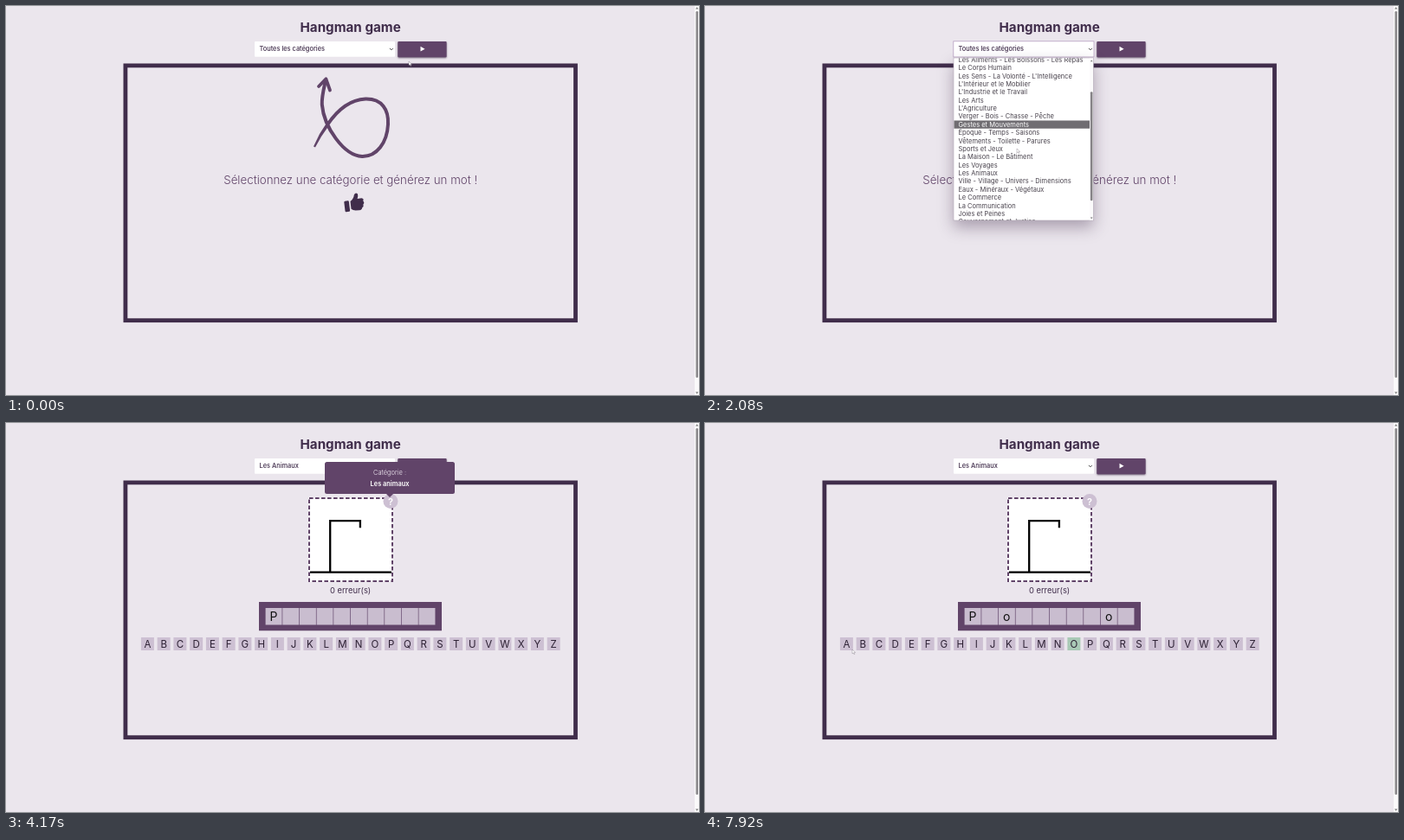
An HTML page with a canvas that plays this animation: 800x450 px, repeating every 8000 ms.

```html
<!DOCTYPE html>
<html lang="fr">
<head>
<meta charset="utf-8">
<title>Hangman game</title>
<style>
html, body { margin: 0; width: 100%; height: 100%; overflow: hidden; background: #ebe6ed; }
canvas { display: block; width: 800px; height: 450px; }
</style>
</head>
<body>
<canvas id="stage"></canvas>
<script>
const LOOP = 8000;
const OPEN = 560, CHOOSE = 3550, PLAY = 3850, GUESS = 7150;
const BG = '#ebe6ed', DARK = '#402d4b', PURPLE = '#614469', LILAC = '#cdc0d3';
const ROW = 9.37, LIST_TOP = 60.3;

const categories = [
  'Toutes les catégories', "L'École - La Classe - L'Instruction", 'Paysages - Climat - Formes',
  'Qualités et Défauts', 'Calcul et Mesures', 'Les Aliments - Les Boissons - Les Repas',
  'Le Corps Humain', "Les Sens - La Volonté - L'Intelligence", "L'Intérieur et le Mobilier",
  "L'Industrie et le Travail", 'Les Arts', "L'Agriculture", 'Verger - Bois - Chasse - Pêche',
  'Gestes et Mouvements', 'Époque - Temps - Saisons', 'Vêtements - Toilette - Parures',
  'Sports et Jeux', 'La Maison - Le Bâtiment', 'Les Voyages', 'Les Animaux',
  'Ville - Village - Univers - Dimensions', 'Eaux - Minéraux - Végétaux', 'Le Commerce',
  'La Communication', 'Joies et Peines', 'Gouvernement et Justice', "L'Armée",
  'Vie Humaine - Maladies - Hygiène'
];

// Pointer tip: time, x, y
const pointerPath = [
  [0, 465, 64], [120, 465, 64], [480, 400, 52], [620, 398, 52], [920, 382, 68],
  [1330, 368, 94.5], [1700, 362, 150], [2080, 360, 165], [2500, 358, 185],
  [3080, 348, 197], [3380, 328, 170], [3580, 325, 169], [3800, 478, 53],
  [3880, 478, 53], [4020, 445, 89], [5300, 444, 91], [5800, 444, 245],
  [6000, 444, 257], [6420, 440, 257], [6850, 441, 257], [7020, 426, 257],
  [7450, 424, 261], [7600, 395, 275], [7920, 170, 262], [8000, 170, 262]
];

const canvas = document.getElementById('stage');
const ctx = canvas.getContext('2d');
const dpr = window.devicePixelRatio || 1;
canvas.width = 800 * dpr;
canvas.height = 450 * dpr;

const ramp = (t, from, to) => {
  const p = Math.min(1, Math.max(0, (t - from) / (to - from)));
  return p * p * (3 - 2 * p);
};

function pointerAt(t) {
  const i = Math.max(1, pointerPath.findIndex(p => p[0] > t));
  const [a, b] = [pointerPath[i - 1], pointerPath[i]];
  const k = ramp(t, a[0], b[0]);
  return [a[1] + (b[1] - a[1]) * k, a[2] + (b[2] - a[2]) * k];
}

const scrollAt = t => 75 * Math.min(1, Math.max(0, (t - 1800) / 424));

function rect(x, y, w, h, color, radius = 0) {
  ctx.fillStyle = color;
  ctx.beginPath();
  ctx.roundRect(x, y, w, h, radius);
  ctx.fill();
}

function poly(color, ...points) {
  ctx.fillStyle = color;
  ctx.beginPath();
  for (let i = 0; i < points.length; i += 2) ctx.lineTo(points[i], points[i + 1]);
  ctx.fill();
}

function stroke(path, color, width) {
  ctx.strokeStyle = color;
  ctx.lineWidth = width;
  ctx.stroke(new Path2D(path));
}

function shadowed(color, dy, blur, draw) {
  ctx.save();
  ctx.shadowColor = color;
  ctx.shadowOffsetY = dy * dpr;
  ctx.shadowBlur = blur * dpr;
  draw();
  ctx.restore();
}

// y is the middle of the capital letters
function text(str, x, y, size, color, weight = 400, align = 'center') {
  ctx.font = `${weight} ${size}px Inter, sans-serif`;
  ctx.textAlign = align;
  ctx.fillStyle = color;
  ctx.fillText(str, x, y + size * 0.364);
}

function drawPage(t) {
  rect(0, 0, 800, 450, BG);
  rect(795, 0, 5, 450, '#faf9fa');
  rect(796.4, 6, 2.6, 424, '#8b898c', 1.3);
  poly('#777', 796, 3.5, 799.4, 3.5, 797.7, 1.2);
  poly('#777', 796, 446.5, 799.4, 446.5, 797.7, 448.8);

  text('Hangman game', 397.6, 24, 15.2, DARK, 700);
  ctx.strokeStyle = DARK;
  ctx.lineWidth = 4.8;
  ctx.strokeRect(137.9, 68.9, 519.6, 294.8);

  const open = t >= OPEN && t < CHOOSE;
  rect(287, 41, 162, 17.7, '#fff', 1);
  if (open) {
    ctx.strokeStyle = '#b9a3c4';
    ctx.lineWidth = 0.8;
    ctx.strokeRect(286.8, 40.8, 162.2, 18.2);
  }
  text(t < CHOOSE ? categories[0] : categories[19], 292.5, 49.8, 7.4, DARK, 500, 'left');
  stroke('M443 48.9 L444.9 50.8 L446.8 48.9', '#333', 0.9);

  shadowed('rgba(50,30,60,.6)', 1, 2, () => rect(452.3, 41, 56.3, 18.2, PURPLE, 1));
  poly('#fff', 478.5, 46.8, 483.6, 49.7, 478.5, 52.6);
}

function drawWelcome() {
  ctx.lineCap = ctx.lineJoin = 'round';
  poly(PURPLE, 355, 162.5, 362, 148, 370, 135.5, 373, 138, 364, 151, 357, 163.5);
  stroke('M371 137.5 C380 124 395 108.5 415 107.5 C434 107 442 120 441 137 ' +
         'C440 158 428 174.5 411 174 C390 173 367 140 364.8 114 C364.3 105 367 95 369 86', PURPLE, 4);
  stroke('M361 93 L369.4 84.3 L374 97.5', PURPLE, 3.8);
  ctx.lineCap = 'butt';
  ctx.lineJoin = 'miter';

  text('Sélectionnez une catégorie et générez un mot !', 397.7, 201, 13.33, PURPLE, 300);

  ctx.save();
  ctx.translate(393.7, 231.8);
  ctx.rotate(-0.12);
  rect(-2.8, -6.3, 5.6, 12.6, DARK, 1.2);
  ctx.restore();
  ctx.fillStyle = DARK;
  ctx.fill(new Path2D('M397.5 226 C400.5 223.5 401.5 221 401.8 218.5 Q403.5 215 406 217.5 ' +
    'Q406.8 220.5 405.6 223 L410.5 222.2 Q413.5 222.8 412.2 225.5 Q414.3 227.5 412.4 229.6 ' +
    'Q413.3 232 411.2 233.2 Q411 235.8 408 236.2 L403.5 236.5 Q400.5 236.3 398.5 234.8 Z'));
}

function drawList(t, pointerY) {
  shadowed('rgba(60,40,70,.38)', 8, 18, () => rect(287, 60, 161.3, 188, '#fff', 1));
  ctx.strokeStyle = '#b5aaba';
  ctx.lineWidth = 0.6;
  ctx.strokeRect(287, 60, 161.3, 188);

  const scroll = scrollAt(t);
  // The highlight lags behind while the list scrolls
  const hovered = Math.floor((pointerY + scrollAt(t - 155) - LIST_TOP) / ROW);
  ctx.save();
  ctx.beginPath();
  ctx.rect(287.3, 60.3, 160.8, 187.5);
  ctx.clip();
  categories.forEach((name, i) => {
    const y = LIST_TOP + i * ROW - scroll;
    if (i === hovered) rect(287.3, y, 156.7, ROW, '#706d72');
    text(name, 292.5, y + ROW / 2, 7.5, i === hovered ? '#fff' : '#48424c', 400, 'left');
  });
  rect(444, 60.3, 4.2, 187.6, '#fbfafb');
  rect(444.9, 66 + scroll * 2 / 3, 2.6, 126, '#858386', 1.2);
  poly('#777', 444.8, 64.3, 447.6, 64.3, 446.2, 62.4);
  poly('#777', 444.8, 244.4, 447.6, 244.4, 446.2, 246.3);
  ctx.restore();
}

function drawGame(t) {
  rect(349, 86, 98, 98, '#fff');
  ctx.strokeStyle = PURPLE;
  ctx.lineWidth = 2;
  ctx.setLineDash([4.6, 2.4]);
  ctx.strokeRect(350, 87, 96, 96);
  ctx.setLineDash([]);
  stroke('M351 172.6 H445 M374.2 172.6 V113.2 H408.9 V121.2', '#000', 2.3);

  ctx.fillStyle = LILAC;
  ctx.beginPath();
  ctx.arc(444, 90.5, 8.5, 0, 7);
  ctx.fill();
  text('?', 444, 90.6, 11, '#fff', 600);
  text('0 erreur(s)', 397.6, 193.6, 9.35, DARK);

  rect(292, 207, 211, 33.3, PURPLE);
  const word = t < GUESS ? 'P         ' : 'P o     o ';
  [...word].forEach((letter, i) => {
    const x = 299.6 + i * 19.65;
    rect(x, 214, 19, 19.5, '#c9bdcf');
    text(letter, x + 9.4, 224, 14, '#111');
  });

  for (let i = 0; i < 26; i++) {
    const letter = String.fromCharCode(65 + i);
    const x = 163.4 + i * 18.75;
    let lift = 0, color = LILAC;
    if (letter === 'P') lift = ramp(t, 5880, 6030) - ramp(t, 6900, 7020);
    if (letter === 'O') {
      lift = ramp(t, 6960, 7080) - ramp(t, 7440, 7580);
      if (t >= GUESS) color = '#a9c9b6';
    }
    const y = 255.5 - lift * 1.6;
    rect(x - 7.5, y - 7.5, 15, 15, color);
    text(letter, x, y + 0.2, 11.5, '#2c2033');
  }

  ctx.globalAlpha = ramp(t, 4010, 4130) - ramp(t, 5360, 5500);
  if (ctx.globalAlpha > 0) {
    rect(368, 45, 150, 37, PURPLE, 2.5);
    poly(PURPLE, 439, 82, 447, 82, 443, 86);
    text('Catégorie :', 443, 57.3, 7.5, '#f3edf5', 300);
    text('Les animaux', 443, 70.2, 7.4, '#fff', 600);
  }
  ctx.globalAlpha = 1;
}

function drawPointer(x, y) {
  ctx.save();
  ctx.translate(x, y);
  const arrow = new Path2D('M0 0 L0 4.8 L1.2 3.8 L2 5.6 L2.9 5.2 L2.1 3.5 L3.6 3.4 Z');
  ctx.fillStyle = '#fff';
  ctx.strokeStyle = 'rgba(90,80,95,.6)';
  ctx.lineWidth = 0.5;
  ctx.fill(arrow);
  ctx.stroke(arrow);
  ctx.restore();
}

function frame() {
  const t = performance.now() % LOOP;
  const [x, y] = pointerAt(t);
  ctx.setTransform(dpr, 0, 0, dpr, 0, 0);
  drawPage(t);
  if (t < PLAY) drawWelcome();
  else drawGame(t);
  if (t >= OPEN && t < CHOOSE) drawList(t, y);
  // The help cursor vanishes over the hint badge
  if (t < 4020 || t > 5300) drawPointer(x, y);
  requestAnimationFrame(frame);
}
frame();
</script>
</body>
</html>
```
